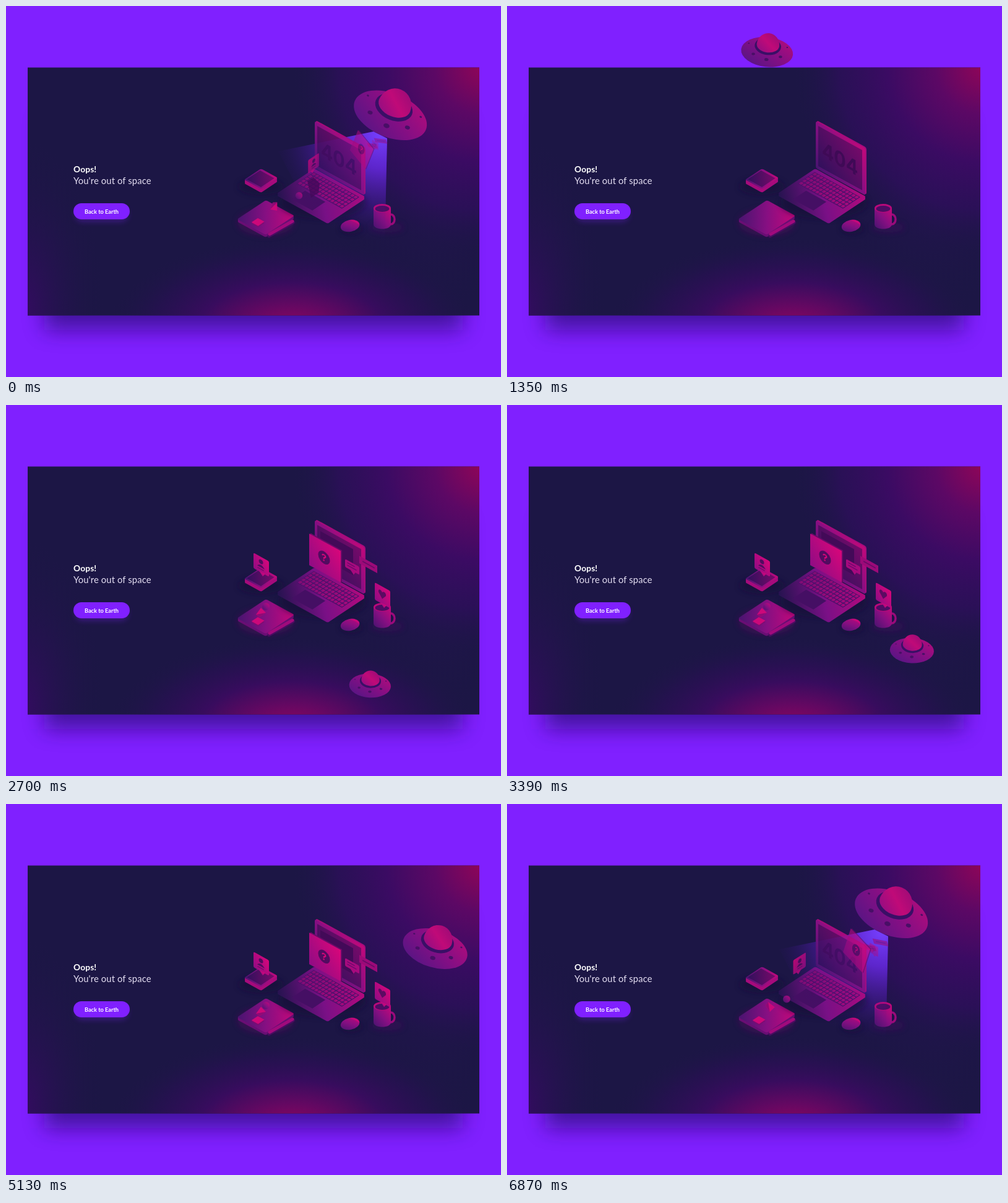
Recreate the animation shown at these times as an HTML page. Size 800x600 px, loop 6900 ms.

```html
<!DOCTYPE html>
<html lang="en">
<head>
<meta charset="utf-8">
<title>Out of space</title>
<style>
  html, body { margin: 0; width: 100%; height: 100%; overflow: hidden; background: #8020ff; }
  svg { display: block; width: 800px; height: 600px; }
  text { font-family: Lato, "Open Sans", sans-serif; }
  .bold { font-family: Inter, "Open Sans", sans-serif; font-weight: 700; text-anchor: middle; }
</style>
</head>
<body>
<svg viewBox="0 0 800 600" xmlns="http://www.w3.org/2000/svg">
  <defs id="defs">
    <filter id="soft" x="-60%" y="-60%" width="220%" height="220%"><feGaussianBlur stdDeviation="5"/></filter>
    <filter id="softer" x="-20%" y="-60%" width="140%" height="220%"><feGaussianBlur stdDeviation="17"/></filter>
  </defs>
  <rect width="800" height="600" fill="#8020ff"/>
  <rect x="62" y="180" width="676" height="344" fill="#2a0a78" opacity=".7" filter="url(#softer)"/>
  <g id="card"></g>

  <text x="109" y="269" font-size="13.8" font-weight="700" letter-spacing=".1" fill="#fff">Oops!</text>
  <text x="109" y="288" font-size="14.8" letter-spacing=".12" fill="#e4def2">You're out of space</text>
  <rect x="112" y="326" width="85" height="23" rx="11" fill="#8020ff" opacity=".3" filter="url(#soft)"/>
  <rect x="109" y="319" width="91" height="26" rx="13" fill="#8020ff"/>
  <text x="154.5" y="335.5" font-size="9.2" font-weight="700" text-anchor="middle" fill="#fff">Back to Earth</text>

  <polygon id="beamBack" fill="url(#beam)"/>
  <g id="desk"></g>
  <polygon id="beamFront" fill="url(#beam)"/>
  <g id="stickers"></g>
  <g id="ufo"></g>
</svg>
<script>
const LOOP = 6900;
const $ = id => document.getElementById(id);

// Gradients: evenly spaced colours, given as "#rgb" or "#rgb/opacity"
const stops = colors => colors.map((color, i) => {
  const [tone, alpha = 1] = color.split('/');
  return `<stop offset="${i / (colors.length - 1)}" stop-color="${tone}" stop-opacity="${alpha}"/>`;
}).join('');
const glow = (id, x, y, rx, ry, ...colors) =>
  `<radialGradient id="${id}" gradientUnits="userSpaceOnUse" cx="0" cy="0" r="1"
    gradientTransform="translate(${x} ${y}) scale(${rx} ${ry})">${stops(colors)}</radialGradient>`;
const ramp = (id, ...colors) =>
  `<linearGradient id="${id}" x1="0" y1="1" x2="1" y2="0">${stops(colors)}</linearGradient>`;

$('defs').innerHTML +=
  glow('right', 690, 290, 190, 210, '#2c0f5c/.5', '#1c1645/0') +
  glow('side', 30, 490, 130, 280, '#330c60', '#1c1645/0') +
  glow('low', 462, 522, 300, 150, '#900560', '#640862', '#380c5e', '#2a0f55/.6', '#1c1645/0') +
  glow('top', 770, 98, 310, 310, '#900558', '#5c0865', '#3b0b63', '#2d0f5a/.8', '#1c1645/0') +
  glow('beam', 606, 205, 175, 175, '#7640ff', '#6428dc/.85', '#4a1aa0/.45', '#2a1260/0') +
  ramp('pink', '#47146f', '#860f82', '#c4087a') +
  ramp('bright', '#8f0c84', '#d8067a') +
  ramp('deck', '#25134f', '#7a1086', '#b2097c') +
  ramp('dark', '#31105c', '#760a6a') +
  ramp('hull', '#4d1784', '#820f84', '#b80b7a') +
  ramp('dome', '#8c0e84', '#c00a78', '#950b76');

const PINK = 'url(#pink)', BRIGHT = 'url(#bright)', DARK = 'url(#dark)', INK = '#520b60', EDGE = '#a60b7c';

// Drawing helpers; floor and wall are the two isometric planes
const FLOOR = '.82 .45 -.6 .4', WALL = '1 .55 0 1';
const plane = (axes, x, y, art) => `<g transform="matrix(${axes} ${x} ${y})">${art}</g>`;
const rect = (x, y, w, h, fill, extra = '') =>
  `<rect x="${x}" y="${y}" width="${w}" height="${h}" fill="${fill}" ${extra}/>`;
const oval = (cx, cy, rx, ry, fill, extra = '') =>
  `<ellipse cx="${cx}" cy="${cy}" rx="${rx}" ry="${ry}" fill="${fill}" ${extra}/>`;
const path = (d, fill, extra = '') => `<path d="${d}" fill="${fill}" ${extra}/>`;
const line = (d, color, width) => path(d, 'none', `stroke="${color}" stroke-width="${width}" stroke-linecap="round"`);
const shadow = (cx, cy, rx, ry, color = '#120d38') => oval(cx, cy, rx, ry, color, 'opacity=".6" filter="url(#soft)"');
const repeat = (count, draw) => Array.from({ length: count }, (_, i) => draw(i)).join('');
const slab = (x, y, w, d, height, top, side, detail = '') =>
  repeat(height, i => plane(FLOOR, x, y + height - i, rect(0, 0, w, d, side, 'rx="3"'))) +
  plane(FLOOR, x, y, rect(0, 0, w, d, top, 'rx="3"') + detail);
const bubble = (w, h, fill) =>
  rect(0, 0, w, h, fill, 'rx="2"') + path(`M${w * .35} ${h - 1}h${w * .4}l${-w * .15} 6z`, fill);

$('card').innerHTML = ['#1c1645', 'url(#right)', 'url(#side)', 'url(#low)', 'url(#top)']
  .map(fill => rect(35, 99.5, 730, 401, fill)).join('');

const keys = rect(5, 8, 90, 47, '#4e0f6c') +
  repeat(70, i => rect(6 + i % 14 * 6.35, 9.5 + Math.floor(i / 14) * 9.1, 5, 7, BRIGHT, `rx="1" opacity="${.5 + i % 14 * .025}"`));

const phone = shadow(412, 292, 36, 13) +
  slab(412, 263, 33, 45, 6, PINK, EDGE, rect(2, 5, 28, 36, DARK));

const notebook = shadow(420, 350, 46, 22, '#4a0858') +
  slab(420, 314, 56, 77, 4, PINK, '#6a0e74') +
  line('M425 372L464 350', '#4a0c62', 5) + line('M426 369L463 348', '#a00a7c', 5);

const laptop = shadow(512, 318, 70, 26) +
  slab(498, 263, 100, 100, 4, 'url(#deck)', 'url(#deck)', keys + rect(26, 60, 40, 35, '#450f64')) +
  repeat(3, i => plane(WALL, 501 - i, 185 + i * .6, rect(0, 0, 80, 76, i < 2 ? EDGE : PINK, 'rx="3"'))) +
  plane(WALL, 503, 194, rect(0, 0, 71, 65, DARK)) +
  `<g id="error"><text class="bold" transform="matrix(.87 .5 0 1 538 259)" font-size="33" fill="#3f0a56">404</text></g>` +
  `<g id="windowShade">${plane(WALL, 508, 204, rect(0, 0, 53, 42, '#430a58'))}</g>`;

const mouse = shadow(558, 360, 18, 8) +
  oval(556, 355.5, 15.5, 9.5, PINK, 'transform="rotate(-12 556 355)"') +
  path('M555 346Q570 345 571 354Q564 349 555 346Z', '#c8087a');

const mug = shadow(616, 358, 26, 8, '#3a0a58') +
  oval(622, 345, 6, 8, 'none', 'stroke="#9a0a7a" stroke-width="3.5"') +
  path('M594 327V353C594 363 622 363 622 353V327Z', PINK) +
  oval(608, 327, 14, 7, '#b8097a') + oval(608, 328, 11.5, 5, '#4d0c64');

$('desk').innerHTML = phone + notebook + laptop + mouse + mug;

const lamp = i => {
  const a = (i - 2) * Math.PI / 4, r = 2 + 3 * Math.cos(a);
  return oval(46 * Math.sin(a), -15 + 34 * Math.cos(a), r, r * .72, '#480f66');
};
$('ufo').innerHTML = oval(-.5, 1, 62, 35.5, 'url(#hull)') + oval(0, -13, 31.5, 21, '#3a0f66') +
  path('M-27 -16A27 28 0 0 1 27 -16A27 18 0 0 1 -27 -16Z', 'url(#dome)') + repeat(5, lamp);

// Each sticker slides in at `land`, then is pulled into the beam from `lift` on
const stickers = [
  { home: [407, 351], land: 1850, slide: 300, from: [0, -9], lift: 6900, pull: 420, bow: 10, turn: 90,
    art: plane(FLOOR, 0, -6, rect(0, 0, 13, 17, '#7d0c72')) + plane(FLOOR, 0, -8, rect(0, 0, 13, 17, '#cc087a')) },
  { home: [420, 326], land: 1890, slide: 270, from: [0, -9], lift: 6717, pull: 290, bow: 16,
    art: oval(0, 0, 6, 6, PINK) },
  { home: [413, 335], land: 1870, slide: 280, from: [0, -9], lift: 6690, pull: 460, bow: 10, turn: 1500,
    art: path('M-9 4L-1 -7L7 1L-3 8Z', '#cc087a') + path('M-9 4L-3 8L7 1Z', '#8f0a76') },
  { home: [413, 258], land: 1700, slide: 520, from: [32, -21], lift: 6632, pull: 360, bow: 17, spin: 9,
    art: plane(WALL, -13, -19, bubble(25, 25, BRIGHT) + oval(12, 8, 3.5, 3.5, INK) + path('M6 17q6 -8 12 0z', INK) +
      line('M7 20h9', '#700a68', 1.5)) },
  { home: [609, 307], land: 1450, slide: 270, from: [0, 12], lift: 6236, pull: 700, bow: -16,
    art: plane(WALL, -13, -20, bubble(25, 28, BRIGHT) + path('M12 20L6 12C5 6 11 6 12 10C13 6 19 6 18 12Z', '#5b0b62')) },
  { home: [560, 258], land: 1450, slide: 450, from: [40, 10], lift: 6400, pull: 560, bow: 0, turn: -30,
    art: plane(WALL, 11, -14, rect(0, 0, 29, 12, '#9c0a78') + line('M6 6h18', '#6a0a68', 2)) +
      plane(WALL, -12, -9, bubble(23, 13, '#a80a7e') + line('M4 4h11M4 8h14', '#6a0a6c', 1.5)) },
  { home: [516, 248], land: 1450, slide: 450, from: [18, 10], lift: 6434, pull: 545, bow: 10, turn: 35,
    art: plane(WALL, -24, -41, rect(0, 0, 51, 52, '#6a0a68')) +
      plane(WALL, -26, -40, rect(0, 0, 51, 51, BRIGHT) + oval(24, 25.5, 9.5, 10, INK) +
        '<text class="bold" x="24" y="31" font-size="15" fill="#d8067a">?</text>') },
];
$('stickers').innerHTML = `<g id="castShade">${path('M487 283L497 277L507 287L505 302L493 310Z', '#43095a')}</g>` +
  stickers.map(s => `<g class="sticker">${s.art}</g>`).join('');
const stickerNodes = [...document.querySelectorAll('.sticker')];

// Timing helpers
const clamp = u => Math.min(1, Math.max(0, u));
const part = (t, start, length) => clamp((t - start) / length);
const smooth = u => u * u * (3 - 2 * u);
const easeOut = power => u => 1 - (1 - u) ** power;
const mix = (a, b, u) => a + (b - a) * u;
const curve = ([a, b, c], u) => [0, 1].map(k => mix(mix(a[k], b[k], u), mix(b[k], c[k], u), u));
// Moves that cross the loop point run on past its end
const unwrap = (t, start) => t < start ? t + LOOP : t;

// The ship holds the end pose of a leg until the next one starts
const legs = [
  { start: 2130, length: 1530, route: [[285, 512], [535, 533], [656, 395]], scale: [.45, .575], turn: [4, 3], ease: easeOut(3) },
  { start: 4560, length: 1230, route: [[656, 395], [772, 260], [633, 178]], scale: [.575, .99], turn: [3, 22], ease: u => easeOut(2)(smooth(u)) },
  { start: 5790, length: 1080, route: [[633, 178], [626, 179], [622, 176]], scale: [.99, 1], turn: [22, 22], ease: smooth },
  { start: 7760, length: 860, route: [[622, 176], [444, 5], [305, 120]], scale: [1, .47], turn: [22, -4], ease: smooth },
];

function flyShip(t) {
  const leg = legs.findLast(l => l.start <= t) || legs[0];
  const u = leg.ease(part(t, leg.start, leg.length));
  const [x, y] = curve(leg.route, u);
  $('ufo').setAttribute('transform',
    `translate(${x} ${y}) rotate(${mix(...leg.turn, u)}) scale(${mix(...leg.scale, u)})`);
  $('ufo').setAttribute('opacity', part(t, 2130, 60) * (1 - part(t, 8480, 140)));
}

const MOUTH = [604, 210];

function moveSticker({ home, land, slide, from, lift, pull, bow, turn = 0, spin = 0 }, node, t) {
  const inside = smooth(part(t, land, slide));
  const drawn = part(t, lift, pull) ** 3;
  const [dx, dy] = [MOUTH[0] - home[0], MOUTH[1] - home[1]];
  const sag = 4 * bow * drawn * (1 - drawn) / Math.hypot(dx, dy);
  const x = home[0] + from[0] * (1 - inside) + dx * drawn - dy * sag;
  const y = home[1] + from[1] * (1 - inside) + dy * drawn + dx * sag;
  const size = 1 - .8 * drawn ** 2;
  node.setAttribute('transform',
    `translate(${x} ${y}) rotate(${turn * drawn}) scale(${size * Math.cos(spin * drawn)} ${size})`);
  node.setAttribute('opacity', inside * (1 - drawn) ** .6);
}

function shineBeam(t) {
  const spread = smooth(part(t, 6050, 550)) - smooth(part(t, 7350, 360));
  const alpha = part(t, 6020, 100) * (1 - part(t, 7720, 80));
  const narrow = [[599, 207], [609, 213], [584, 300], [560, 300], [540, 250]];
  const wide = [[594, 203], [616, 214], [612, 392], [500, 350], [440, 235]];
  const cone = narrow.map(([x, y], i) => `${mix(x, wide[i][0], spread)},${mix(y, wide[i][1], spread)}`).join(' ');
  for (const [id, strength] of [['beamBack', 1], ['beamFront', .2]]) {
    $(id).setAttribute('points', cone);
    $(id).setAttribute('opacity', alpha * strength);
  }
}

function render(t) {
  const late = unwrap(t, 1450);
  flyShip(unwrap(t, 1900));
  shineBeam(late);
  stickers.forEach((s, i) => moveSticker(s, stickerNodes[i], late));
  const shade = part(late, 1500, 300) - part(late, 6150, 400);
  $('windowShade').setAttribute('opacity', shade);
  $('error').setAttribute('opacity', 1 - shade);
  $('castShade').setAttribute('opacity', .8 * (part(late, 6870, 30) - part(late, 6900, 90)));
}

const began = performance.now();
function frame() {
  render((performance.now() - began) % LOOP);
  requestAnimationFrame(frame);
}
render(0);
requestAnimationFrame(frame);
</script>
</body>
</html>
```
